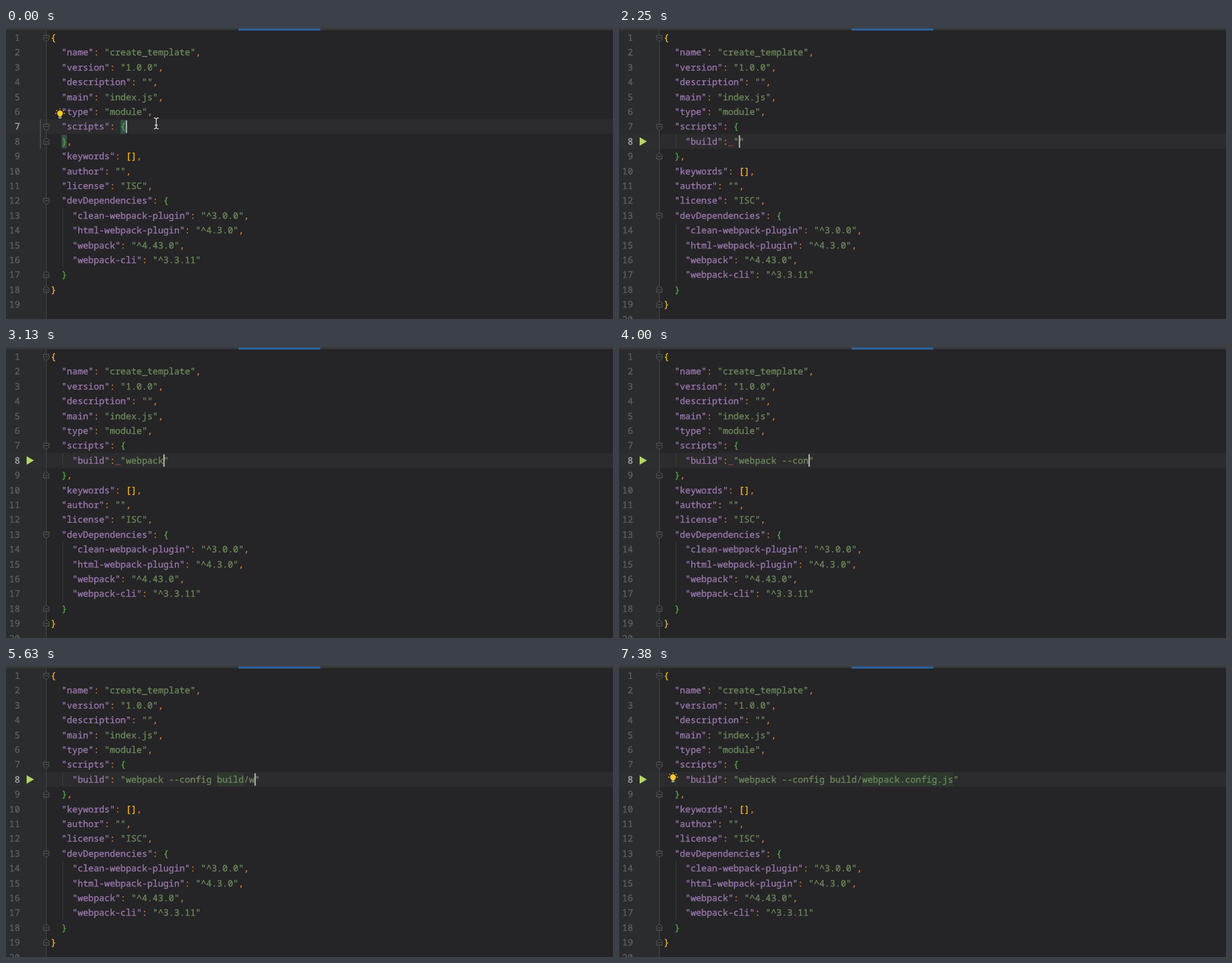
Recreate the animation shown at these times as an HTML page. Size 1000 px wide and 479 px high, loop 7510 ms.

```html
<!DOCTYPE html>
<html lang="en">
<head>
<meta charset="utf-8">
<title>Editing build script</title>
<style>
  html, body { margin: 0; width: 100%; height: 100%; overflow: hidden; background: #252427; }
  svg { display: block; width: 100vw; height: 100vh; }
  text { text-rendering: geometricPrecision; white-space: pre; }
  .code { font: 14.72px "Noto Sans Mono", "DejaVu Sans Mono", monospace; stroke-width: .4px; }
  .item { font: 15.45px "Noto Sans Mono", "DejaVu Sans Mono", monospace; stroke-width: .25px; }
  .tip { font: 12.65px Inter, "Liberation Sans", sans-serif; stroke-width: .15px; }
</style>
</head>
<body>
<svg id="stage" viewBox="0 0 1000 479" preserveAspectRatio="none"></svg>
<script>
const LOOP = 7510, STEP = 12.5;
const X0 = 73.8, CHAR = 8.832, ROW = 24.39;
const C = {
  key: '#9876aa', str: '#6a8759', punct: '#cc7832', plain: '#a9b7c6',
  gold: '#f2b81c', green: '#55a845', num: '#5d6063', numOn: '#a9a9a9', fold: '#5b5d5f'
};

const HEAD = ['{', '  "name": "create_template",', '  "version": "1.0.0",', '  "description": "",',
  '  "main": "index.js",', '  "type": "module",', '  "scripts": {'];
const TAIL = ['  },', '  "keywords": [],', '  "author": "",', '  "license": "ISC",',
  '  "devDependencies": {', '    "clean-webpack-plugin": "^3.0.0",',
  '    "html-webpack-plugin": "^4.3.0",', '    "webpack": "^4.43.0",',
  '    "webpack-cli": "^3.3.11"', '  }', '}', ''];

const PKG = ['webpack', 'webpack-cli', 'which'];
const PKG2 = PKG.slice(0, 2);
const FILE = ['webpack.config.js'];

// Edits: step, text up to the caret, text after it, suggestions, typed prefix length
const quoted = (s, list, typed) => ['    "build": "' + s, '"', list, typed];
const EDITS = [
  [4, '    ', ''],
  [7, '    b', ''],
  [8, '    bu', ''],
  [9, '    bui', ''],
  [10, '    buil', ''],
  [11, '    build', ''],
  [13, '    "build":', ''],
  [14, '    "build": ', ''],
  [17, ...quoted('')],
  [19, ...quoted('w')],
  [20, ...quoted('w', PKG, 1)],
  [22, ...quoted('we', PKG2, 2)],
  [23, ...quoted('web', PKG2, 3)],
  [25, ...quoted('webpack')],
  [28, ...quoted('webpack ')],
  [29, ...quoted('webpack -')],
  [30, ...quoted('webpack --')],
  [31, ...quoted('webpack --c')],
  [32, ...quoted('webpack --con')],
  [33, ...quoted('webpack --conf')],
  [34, ...quoted('webpack --config')],
  [35, ...quoted('webpack --config ')],
  [37, ...quoted('webpack --config b')],
  [38, ...quoted('webpack --config b', ['build'], 1)],
  [39, ...quoted('webpack --config bu', ['build'], 2)],
  [40, ...quoted('webpack --config bui', ['build'], 3)],
  [42, ...quoted('webpack --config build')],
  [43, ...quoted('webpack --config build/')],
  [45, ...quoted('webpack --config build/w')],
  [46, ...quoted('webpack --config build/w', FILE, 1)],
  [47, ...quoted('webpack --config build/we', FILE, 2)],
  [48, ...quoted('webpack --config build/webpack.config.js')]
];

const esc = s => s.replace(/&/g, '&amp;').replace(/</g, '&lt;');
const ink = color => `fill="${color}" stroke="${color}"`;
const colX = c => X0 + c * CHAR;
const rowY = n => 16 + (n - 1) * ROW;
const rect = (x, y, w, h, fill, extra = '') =>
  `<rect x="${x}" y="${y}" width="${w}" height="${h}" fill="${fill}" ${extra}/>`;
const path = (d, stroke, w = 1, fill = 'none') =>
  `<path d="${d}" fill="${fill}" stroke="${stroke}" stroke-width="${w}"/>`;
const text = (x, y, s, color, cls = 'code', extra = '') =>
  `<text class="${cls}" x="${x}" y="${y}" ${ink(color)} ${extra}>${esc(s)}</text>`;

function codeLine(line, n) {
  let out = '';
  for (const m of line.matchAll(/"[^"]*"?|[{}]|[\[\]]+|[:,]|[^\s"{}\[\]:,]+/g)) {
    const s = m[0], next = line[m.index + s.length];
    const deep = line.startsWith('  ');
    const color = s[0] === '"' ? (next === ':' ? C.key : C.str)
      : /[{}]/.test(s) ? (deep ? C.green : C.gold)
      : /[\[\]]/.test(s) ? C.gold
      : /[:,]/.test(s) ? C.punct : C.plain;
    out += text(colX(m.index), rowY(n) + 5.1, s, color);
  }
  return out;
}

function foldMark(n, opens) {
  const s = opens ? 1 : -1, y = rowY(n) + (opens ? 1 : -.5);
  return path(`M62 ${y - 5 * s}H71V${y + 1.5 * s}L66.5 ${y + 5.5 * s}L62 ${y + 1.5 * s}Z`, C.fold, 1, '#28292b')
    + path(`M64 ${y - s}H69`, C.fold);
}

function bulb(y) {
  const rays = [-90, -140, -40, 180, 0].map(a => {
    const r = a * Math.PI / 180, p = d => `${89 + d * Math.cos(r)} ${y + d * Math.sin(r)}`;
    return `M${p(6.2)}L${p(8)}`;
  }).join('');
  return path(rays, '#f0c32c', 1.3)
    + `<circle cx="89" cy="${y}" r="4.7" fill="#fbcb2b"/>`
    + rect(86.7, y + 3.2, 4.6, 2.4, '#fbcb2b') + rect(86.7, y + 6.4, 4.6, 1.9, '#b9bcbf');
}

function ibeam(x, y) {
  const d = `M${x - 4} ${y - 9}Q${x} ${y - 9} ${x} ${y - 6}V${y + 6}Q${x} ${y + 9} ${x - 4} ${y + 9}`
    + `M${x + 4} ${y - 9}Q${x} ${y - 9} ${x} ${y - 6}M${x} ${y + 6}Q${x} ${y + 9} ${x + 4} ${y + 9}M${x - 2.5} ${y + 3}H${x + 2.5}`;
  return path(d, '#18181a', 3) + path(d, '#e8e8e8', 1.4);
}

function itemIcon(x, y, folder) {
  if (!folder) return rect(x + 9, y - 6.5, 13, 13, '#e0ad3c');
  return path(`M${x + 8} ${y - 5.5}h5l2 2h8v9h-15z`, 'none', 0, '#c4593b')
    + rect(x + 15, y - 1, 9, 7, '#edc4bd', 'rx="1"');
}

function popup(x, items, typed) {
  const top = 198.5, h = 22.2, foot = top + items.length * h + 12.8;
  const height = items.length * h + 24.5;
  let out = [9, 6, 3].map(d =>
    rect(x - d / 2, top + 2, 600 + d, height + d, '#151517', `opacity=".15" rx="${d}"`)).join('')
    + rect(x, top, 600, height, '#303235')
    + rect(x, top, 600, h + .5, '#46484b');
  items.forEach((s, i) => {
    const y = top + 11.5 + i * h, tx = x + 28.6;
    out += itemIcon(x, y, s === 'build')
      + `<text class="item" x="${tx}" y="${y + 5.3}" ${ink('#c0c2c4')}><tspan ${ink('#2d6ca6')}>${s.slice(0, typed)}</tspan>${s.slice(typed)}</text>`;
  });
  const dim = '#35699b', base = foot + 4.3;
  const hat = dx => path(`M${x + dx} ${foot - 1}l3.5 -3.5l3.5 3.5`, dim, 1.2);
  out += hat(6.5) + text(x + 15, base, '↓', dim, 'tip') + text(x + 29.5, base, 'and', dim, 'tip')
    + hat(57) + text(x + 65, base, '↑', dim, 'tip')
    + text(x + 80, base, 'will move caret down and up in the editor', dim, 'tip')
    + text(x + 332.5, base, 'Next Tip', '#3b92e8', 'tip');
  for (const dy of [-4.7, 0, 4.7]) out += rect(x + 585.5, foot + dy - 1.4, 2.8, 2.8, '#edc22e', 'rx=".6"');
  return out;
}

function draw(k) {
  const edit = EDITS.filter(e => e[0] <= k).pop();
  const [, before = HEAD[6], after = '', items, typed] = edit || [];
  const lines = [...HEAD, ...(edit ? [before + after] : []), ...TAIL];
  const active = edit ? 8 : 7, shift = edit ? 1 : 0;
  const y = rowY(active), top = y - 12.2;

  let out = rect(0, 0, 1000, 479, '#252427') + rect(0, 0, 66, 479, '#2a2c2e')
    + rect(66, top, 934, ROW, '#2c2b2d') + rect(0, top, 66, ROW, '#2d2e30')
    + rect(0, 0, 1000, 3.5, '#37393b') + rect(383, .8, 135, 3.4, '#2f649b', 'rx="1"')
    + path('M66.5 4V479', '#47494b');

  // Indent guides
  out += path(`M93.5 ${rowY(13 + shift) - 12}V${rowY(16 + shift) + 12}`, '#2f4632');
  if (edit) out += path(`M93.5 ${top}V${top + ROW}`, '#2f4632');

  // Matching braces and their gutter line
  if (!edit) {
    out += rect(colX(13), top + 1, CHAR, ROW - 1, '#345049') + rect(colX(2), rowY(8) - 11, CHAR, ROW - 2, '#345049')
      + path(`M56.5 ${top}V${rowY(8) + 12}`, '#626466');
  }

  // Resolved path segment
  if (k >= 48) out += rect(colX(37), top + .5, 17 * CHAR, ROW - 1, '#2d382e');
  else if (k >= 42) out += rect(colX(31), top + .5, 5 * CHAR, ROW - 1, '#2d382e');

  lines.forEach((line, i) => {
    const n = i + 1;
    out += text(23, rowY(n) + 5.1, String(n), n === active ? C.numOn : C.num, 'code', 'text-anchor="end"') + codeLine(line, n);
    if (/\{$/.test(line)) out += foldMark(n, true);
    if (/^ *\},?$/.test(line)) out += foldMark(n, false);
  });

  if (k >= 14) out += path(`M34 ${y - 7}L46 ${y}L34 ${y + 7}Z`, 'none', 0, '#b5d568');
  if (k >= 14 && k < 43) out += path(`M${colX(12)} ${y + 8}l2.2 -1.8l2.2 1.8l2.2 -1.8l2.2 1.8`, '#b8503a');

  const hidden = k === 59 || (k >= 51 && k <= 54);
  if (!hidden) out += rect(colX(before.length) + .1, top + 2, 1.8, 20.5, '#cfcfcf');

  if (!edit) out += bulb(140.5);
  if (k >= 53) out += bulb(183);
  if (k < 7) out += ibeam(247.5, 157);
  if (items) out += popup(colX(before.length - typed) - 28.6, items, typed);
  return out;
}

const stage = document.getElementById('stage');
const startOf = k => Math.round(k * STEP) * 10;
let shown = -1;
function tick() {
  const t = performance.now() % LOOP;
  let k = Math.min(59, Math.floor(t / 10 / STEP));
  if (startOf(k) > t) k--;
  if (k !== shown) stage.innerHTML = draw(shown = k);
  requestAnimationFrame(tick);
}
tick();
</script>
</body>
</html>
```
